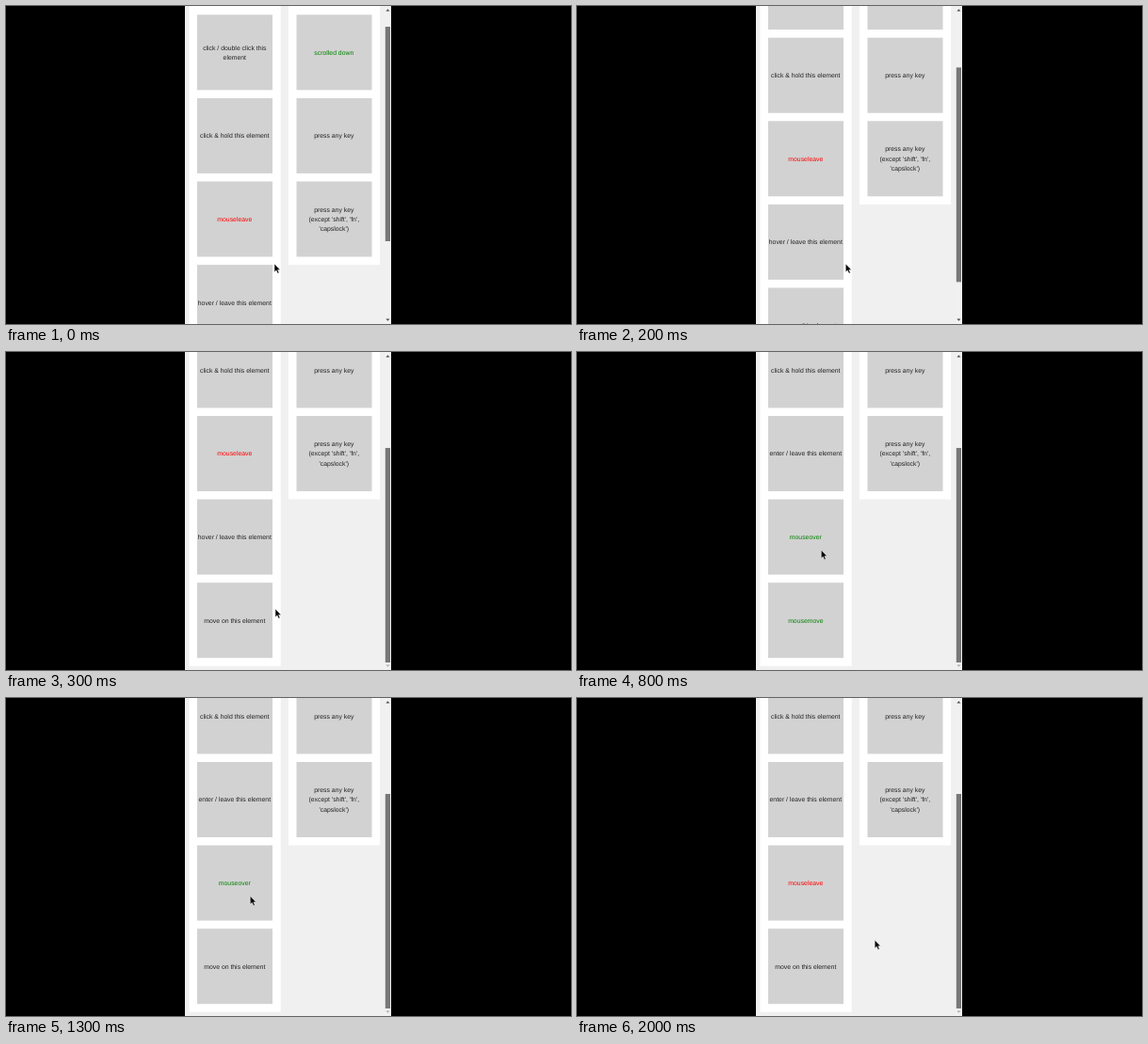
These frames come from a looping animation (600x338 px, 2.1 s). An HTML page:

```html
<!DOCTYPE html>
<html lang="en">
<head>
<meta charset="utf-8">
<title>Mouse events</title>
<style>
  html, body { margin: 0; width: 100%; height: 100%; overflow: hidden; background: #000; }
  svg { display: block; width: 100%; height: 100%; }
  text {
    font: 6.85px "Liberation Sans", Arial, sans-serif;
    text-anchor: middle;
    text-rendering: geometricPrecision;
    fill: #222;
  }
</style>
</head>
<body>
<svg viewBox="0 0 600 338">
  <defs><clipPath id="view"><rect x="190" width="219" height="338"/></clipPath></defs>
  <rect width="600" height="338" fill="#000"/>
  <g clip-path="url(#view)">
    <rect x="190" width="219" height="338" fill="#f0f0f0"/>
    <g id="page"></g>
    <rect x="402" width="7" height="338" fill="#f1f1f1"/>
    <rect id="thumb" x="402.8" width="5.2" height="228" fill="#787878"/>
    <path d="M403.4 5.5h4l-2-2.2z" fill="#444"/>
    <path id="down" d="M403.4 332.6h4l-2 2.2z"/>
    <path id="cursor" d="M0 0V8.8L2 7L3.5 10.2L5 9.5L3.6 6.4H6.2Z" fill="#000" stroke="#fff" stroke-width=".5"/>
  </g>
</svg>
<script>
const NS = "http://www.w3.org/2000/svg";
const LOOP = 2100, STEP = 100;
const SIZE = 80, PITCH = 88.6, TOP = 9.3, LINE = 10.2;
const GREEN = "#008000", RED = "#f00", DARK = "#222";
const $ = id => document.getElementById(id);
const page = $("page");

function add(parent, tag, attrs) {
  const el = document.createElementNS(NS, tag);
  for (const key in attrs) el.setAttribute(key, attrs[key]);
  parent.appendChild(el);
  return el;
}

function tile(x, row, lines, fill = DARK) {
  const y = TOP + row * PITCH;
  add(page, "rect", { x, y, width: SIZE, height: SIZE, fill: "#d2d2d2" });
  const first = y + SIZE / 2 + 2.4 - (lines.length - 1) * LINE / 2;
  return lines.map((line, i) => {
    const label = add(page, "text", { x: x + 39.8, y: first + i * LINE });
    setLabel(label, line, fill);
    return label;
  })[0];
}

function setLabel(label, text, fill = DARK) {
  if (label.textContent !== text) label.textContent = text;
  label.style.fill = fill;
}

function card(x, rows) {
  const bottom = TOP + rows * PITCH;
  add(page, "rect", { x, y: -15, width: 97.2, height: bottom + 15, fill: "#fff" });
}

card(194.5, 5);
card(299.9, 3);
tile(203, 0, ["click / double click this", "element"]);
tile(203, 1, ["click & hold this element"]);
const enter = tile(203, 2, ["enter / leave this element"]);
const hover = tile(203, 3, ["hover / leave this element"]);
const move = tile(203, 4, ["move on this element"]);
tile(308.5, 0, ["scrolled down"], GREEN);
tile(308.5, 1, ["press any key"]);
tile(308.5, 2, ["press any key", "(except 'shift', 'fn',", "'capslock')"]);

// One value per step; the last one holds.
const scrolls = [0, 22.5, 64.2, 118.5];
const approach = [[285, 274], [285, 274], [285.3, 274], [286, 273], [285, 273],
                  [281, 274], [272, 274.5], [262.5, 224], [259.3, 210.5]];
const leave = [[259.3, 210.5], [259.3, 210.5], [264, 214.5], [274, 223],
               [288, 234], [306.5, 249], [314, 255.5], [316.2, 257.3]];
const hold = (list, i) => list[Math.min(i, list.length - 1)];

function draw(time) {
  const k = Math.floor((time % LOOP) / STEP);
  const scroll = hold(scrolls, k);
  const [x, y] = k < 13 ? hold(approach, k) : hold(leave, k - 13);

  page.setAttribute("transform", `translate(0 ${-scroll})`);
  $("thumb").setAttribute("y", 22 + scroll * 0.675);
  $("down").setAttribute("fill", k < 3 ? "#444" : "#aaa");
  $("cursor").setAttribute("transform", `translate(${x} ${y})`);

  if (k < 7) setLabel(enter, "mouseleave", RED);
  else setLabel(enter, "enter / leave this element");

  if (k < 7) setLabel(hover, "hover / leave this element");
  else if (k < 17) setLabel(hover, "mouseover", GREEN);
  else setLabel(hover, "mouseleave", RED);

  if (k >= 5 && k < 13) setLabel(move, "mousemove", GREEN);
  else setLabel(move, "move on this element");
}

const start = performance.now();
function frame() {
  draw(performance.now() - start);
  requestAnimationFrame(frame);
}
draw(0);
requestAnimationFrame(frame);
</script>
</body>
</html>
```
